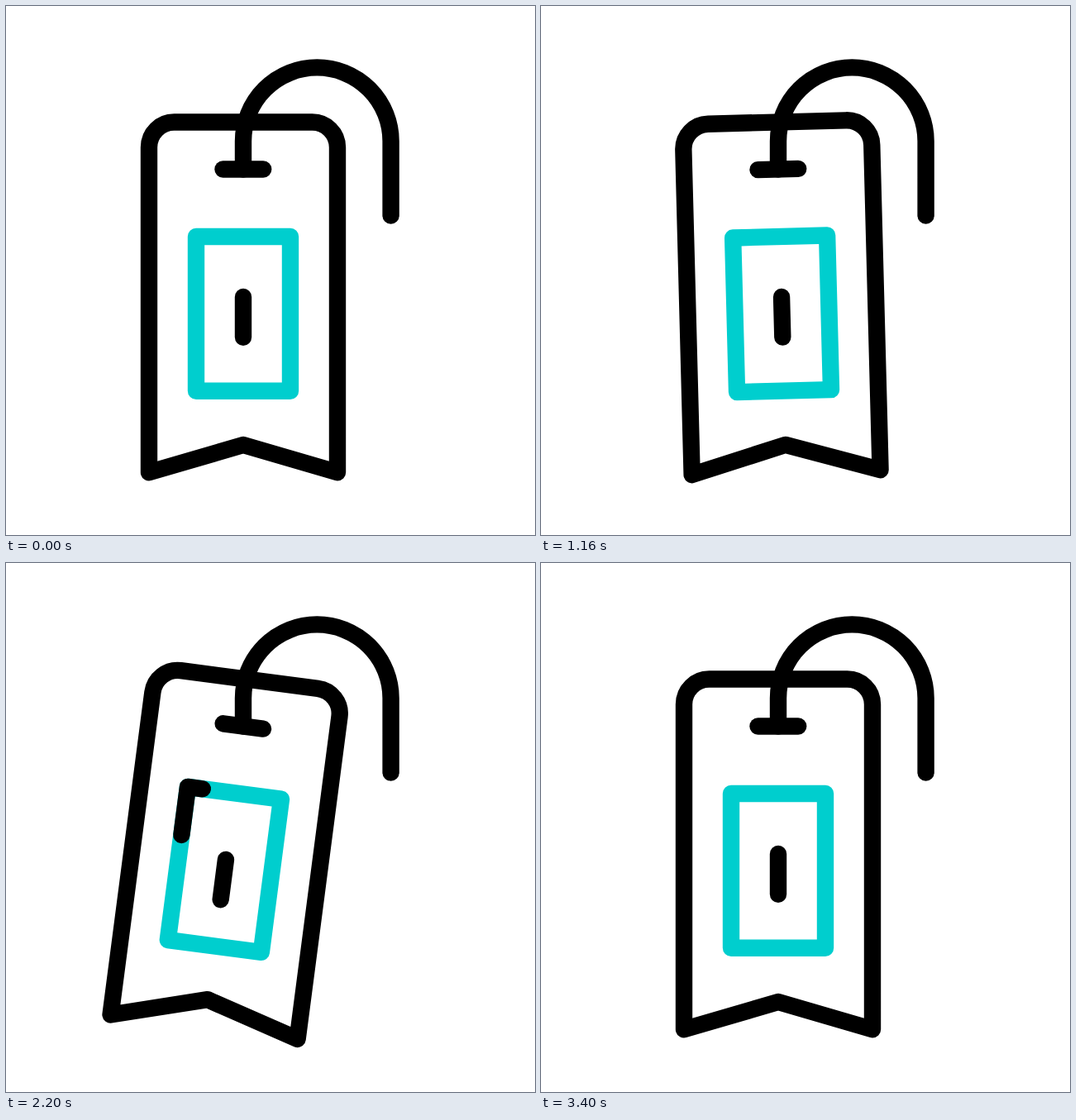
These frames come from a looping animation (640x640 px, 3520 ms). An HTML page:

```html
<!DOCTYPE html>
<html lang="en">
<head>
<meta charset="utf-8">
<title>Swinging tag</title>
<style>
  html, body { margin: 0; height: 100%; overflow: hidden; background: #fff; }
  svg { display: block; width: 100vw; height: 100vh; }
  path { fill: none; stroke: #000; stroke-width: 20.4; stroke-linecap: round; stroke-linejoin: round; }
  .frame { stroke: #00cece; }
</style>
</head>
<body>
<svg viewBox="0 0 640 640">
  <g id="tag">
    <path d="M173 564.3V171a30.5 30.5 0 0 1 30.5-30.5h167a30.5 30.5 0 0 1 30.5 30.5V564.3L287 531Z"/>
    <path d="M262.5 197.5H311.2"/>
    <path class="frame" d="M344 465.7V279H230V465.7Z"/>
    <path id="runner" pathLength="1" d="M344 465.7V279H230V465.7H344"/>
    <path id="bar" d="M287 352V400.7"/>
  </g>
  <path d="M287 197.5V163.7a89.3 89.3 0 0 1 178.6 0V253.5"/>
</svg>
<script>
const LOOP = 3520, STEP = 40;
const [tag, runner, bar] = ['tag', 'runner', 'bar'].map(id => document.getElementById(id));

// Keys: [time, value, optional ease-out influence]
const swing = [[0, 0], [400, 23.1], [520, 23.1, .655], [960, -20], [1360, 17], [1760, -14],
  [2120, 10.1], [2440, -7], [2760, 4], [3080, -2], [3400, 0]];
const slide = [[1680, 0], [1920, -30], [2380, 28], [2720, 0]];
const tail = [[1720, 0], [2720, 1]];
const head = [[1680, 0], [2600, 1]];

// Cubic bezier (influence, 0, 2/3, 1), solved by bisection
function ease(u, influence = 1 / 3) {
  let low = 0, high = 1;
  for (let i = 0; i < 24; i++) {
    const s = (low + high) / 2, r = 1 - s;
    if (3 * influence * s * r * r + 2 * s * s * r + s ** 3 < u) low = s; else high = s;
  }
  return low * low * (3 - 2 * low);
}

function valueAt(keys, t) {
  if (t <= keys[0][0]) return keys[0][1];
  const next = keys.findIndex(key => key[0] > t);
  if (next < 0) return keys[keys.length - 1][1];
  const [t0, v0, influence] = keys[next - 1], [t1, v1] = keys[next];
  return v0 + (v1 - v0) * ease((t - t0) / (t1 - t0), influence);
}

const start = performance.now();

function draw(now) {
  const t = Math.floor(Math.max(0, now - start) % LOOP / STEP) * STEP;
  const from = valueAt(tail, t), length = valueAt(head, t) - from;
  tag.setAttribute('transform', `rotate(${valueAt(swing, t)} 287 197.5)`);
  bar.setAttribute('transform', `translate(0 ${valueAt(slide, t)})`);
  runner.style.visibility = length > .0001 ? 'visible' : 'hidden';
  runner.style.strokeDasharray = `${length} 2`;
  runner.style.strokeDashoffset = -from;
  requestAnimationFrame(draw);
}
draw(start);
</script>
</body>
</html>
```
